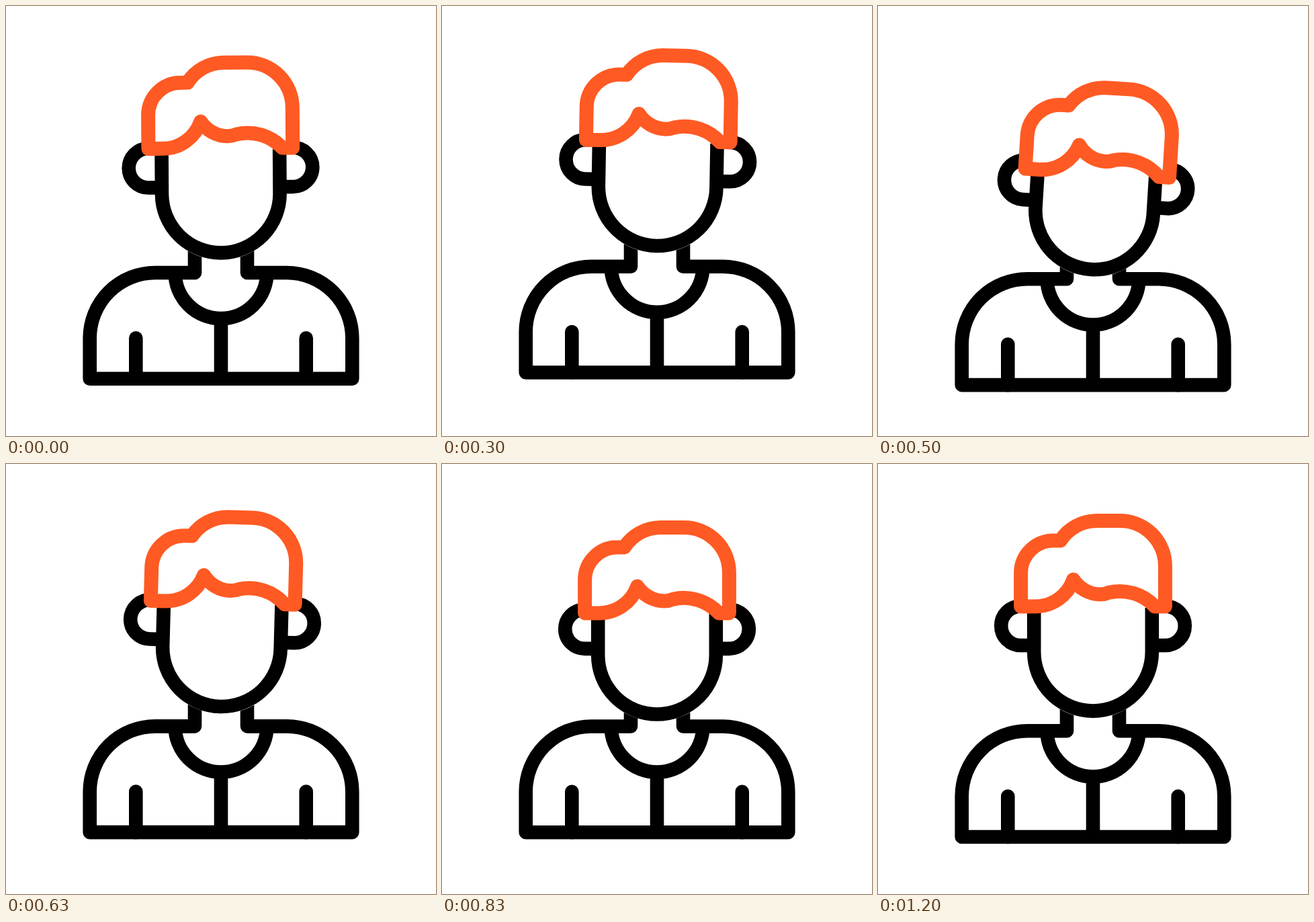
Animation, 640 px wide and 640 px high, one loop 1.67 s. Source, as an HTML page:

```html
<!DOCTYPE html>
<html lang="en">
<head>
<meta charset="utf-8">
<title>Person icon</title>
<style>
  html, body { margin: 0; width: 100%; height: 100%; overflow: hidden; background: #fff; }
  svg { display: block; width: 100%; height: 100%; }
  path { fill: none; stroke: #000; stroke-width: 20.6; stroke-linejoin: round; }
  .cap { stroke-linecap: round; }
  .skin { fill: #fff; stroke: #fff; stroke-width: 21; }
  #hair path { fill: #fff; stroke: #ff5a23; stroke-width: 21; }
</style>
</head>
<body>
<svg viewBox="0 0 640 640">
  <g id="body">
    <path d="M281 345V397.2H222A97.3 97.3 0 0 0 124.7 494.5V555H515.3V494.5A97.3 97.3 0 0 0 418 397.2H359V345"/>
    <path d="M251.6 397A68.4 68.4 0 0 0 388.4 397M320 465V555"/>
    <path class="cap" d="M193.3 494.5V555M446.7 494.5V555"/>
  </g>
  <g id="head">
    <path class="skin" d="M232.2 214V279.8A87.8 87.8 0 0 0 407.8 279.8V214"/>
    <path d="M232 270H212.4A29.2 29.2 0 0 1 212.4 211.6H220M408 270H427.6A29.2 29.2 0 0 0 427.6 211.6H420"/>
    <path d="M232.2 214V279.8A87.8 87.8 0 0 0 407.8 279.8V214"/>
  </g>
  <g id="hair">
    <path d="M212.6 212V162A48.4 48.4 0 0 1 261 114H271.5A64.2 64.2 0 0 1 325 84.5H360A67.4 67.4 0 0 1 427.4 152V212H412A71.3 71.3 0 0 0 344 191.3Q337.5 194 331 194A48.3 48.3 0 0 1 290.7 172A60 60 0 0 1 234 212Z"/>
  </g>
</svg>
<script>
const LOOP = 1670, FPS = 30, PIVOT = '320 315';

// Turning points of each swing, timed in steps of 1/30 s.
const nod = [-1, 9, 13.5, 20.7, 28.3, 36];
const bodyY = swing([-1, 9, 11.7, 20.9, 33, 36], [0, -9.5, 16.5, -9.5, 1.4, 0]);
const headY = swing(nod, [0, -10.6, 28.8, -12, 16, 0]);
const hairY = swing(nod, [0, -11, 42.2, -13, 25, 0]);
const tilt = swing([-1, 3.5, 13.2, 23.5], [0, -3.3, 3.8, 0]);

const [body, head, hair] = ['body', 'head', 'hair'].map(id => document.getElementById(id));

// Sine easing from one turning point to the next, then rest.
function swing(times, values) {
  return x => {
    const i = times.findIndex(t => t > x);
    if (i < 0) return values.at(-1);
    const u = (x - times[i - 1]) / (times[i] - times[i - 1]);
    const ease = (1 - Math.cos(Math.PI * u)) / 2;
    return values[i - 1] + (values[i] - values[i - 1]) * ease;
  };
}

function pose(el, y, angle = 0) {
  el.setAttribute('transform', `translate(0 ${y}) rotate(${angle} ${PIVOT})`);
}

function draw(ms) {
  const step = Math.floor(ms * FPS / 1000 + 0.12);
  const angle = tilt(step);
  pose(body, bodyY(step));
  pose(head, headY(step), angle);
  pose(hair, hairY(step), angle);
}

const start = performance.now();
function tick() {
  draw((performance.now() - start) % LOOP);
  requestAnimationFrame(tick);
}
tick();
</script>
</body>
</html>
```
